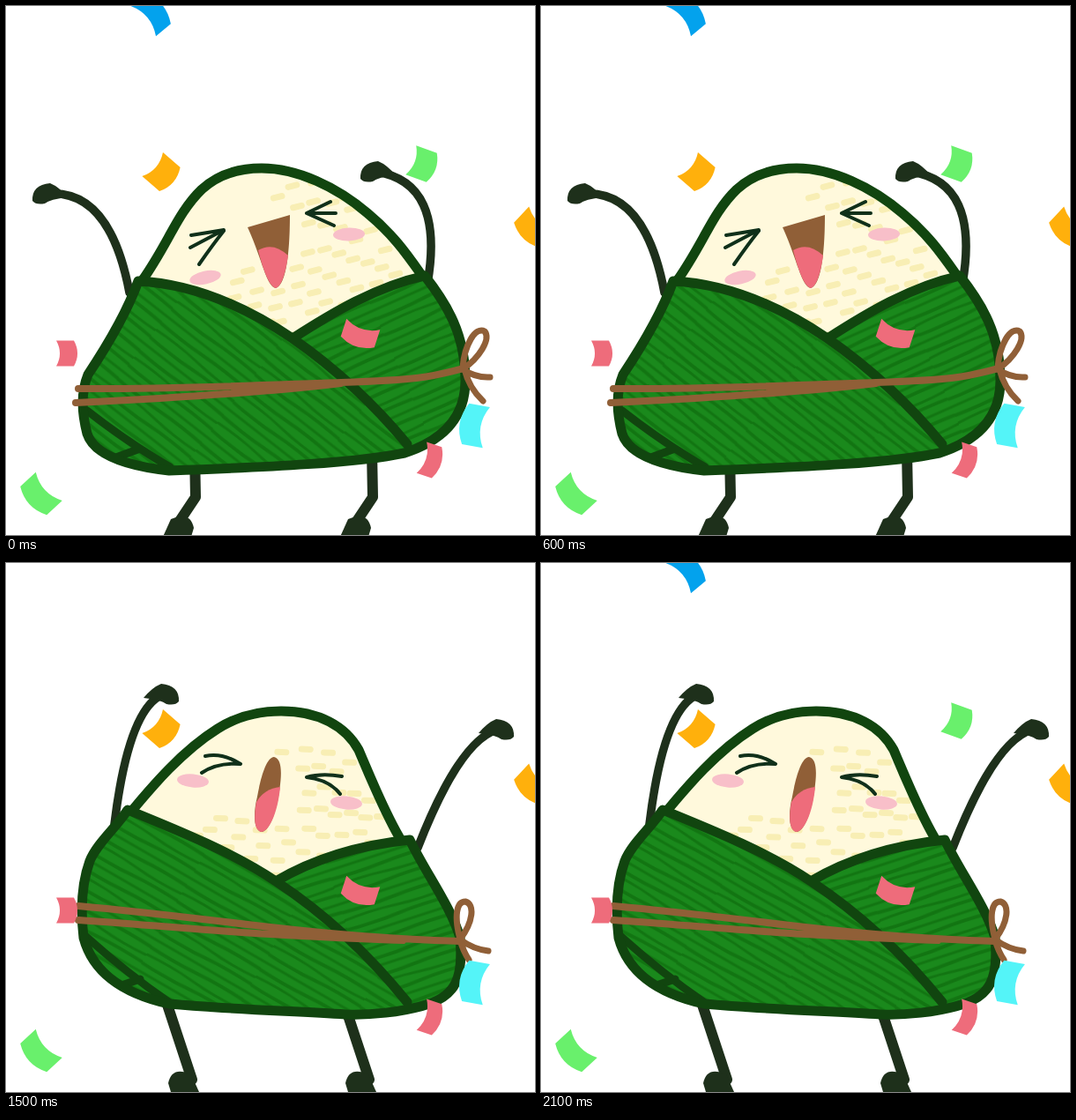
Write an HTML page that moves like this. It is 600x600 px and loops after 2.4 s.

```html
<!DOCTYPE html>
<html lang="en">
<head>
<meta charset="utf-8">
<title>Dancing rice dumpling</title>
<style>
  html, body { margin: 0; width: 100%; height: 100%; overflow: hidden; background: #fff; }
  svg { display: block; width: 100vw; height: 100vh; }
  .line { fill: none; stroke-linecap: round; stroke-linejoin: round; }
</style>
</head>
<body>
<svg id="stage" viewBox="0 0 600 600"></svg>
<script>
const C = {
  edge: '#11450f', leaf: '#1a891c', vein: '#127512', rice: '#fff9dc', grain: '#f8eeb4',
  limb: '#1e301b', eye: '#10301a', brown: '#905f37', pink: '#ee6c7b', cheek: '#f8bfc9',
  blue: '#03a2ed', orange: '#ffb00c', lime: '#69f06c', cyan: '#54f4f8'
};

const fill = (color, d) => `<path d="${d}" fill="${color}"/>`;
const line = (color, width, d) => `<path class="line" d="${d}" stroke="${color}" stroke-width="${width}"/>`;
const group = (content, attrs) => `<g ${attrs}>${content}</g>`;
const move = (content, x, y, flip = 1) => group(content, `transform="translate(${x} ${y}) scale(${flip} 1)"`);
const turn = (content, x, y, angle) => group(content, `transform="translate(${x} ${y}) rotate(${angle})"`);
const clip = (content, id) => group(content, `clip-path="url(#${id})"`);
const clipPath = (id, d) => `<clipPath id="${id}"><path d="${d}"/></clipPath>`;

// Slightly wavy leaf veins, repeated as a tile
function veins(id, angle) {
  let lines = '';
  for (let i = 0; i < 4; i++) {
    const y = 5 + i * 10, sway = Math.sin(i * 2.4) * 3;
    lines += line(C.vein, 3 + (i % 2) * 0.8, `M-5 ${y} Q30 ${y + sway} 60 ${y} T125 ${y}`);
  }
  return `<pattern id="${id}" width="120" height="40" patternUnits="userSpaceOnUse"
    patternTransform="rotate(${angle})"><rect width="120" height="40" fill="${C.leaf}"/>${lines}</pattern>`;
}

// Rice grains on rings around the mouth, leaving out the cheek on the left
function grains([x, y], tilt) {
  let out = '';
  for (let r = 46; r < 160; r += 17) {
    for (let a = r - 115 + tilt; a < 155 + tilt; a += 1550 / r) {
      const rad = (a + 5 * Math.sin(r + a)) * Math.PI / 180;
      out += turn(line(C.grain, 7, 'M-5 0H5'), x + r * Math.cos(rad), y + r * Math.sin(rad), tilt);
    }
  }
  return out;
}

const looks = {
  left: {
    rice: 'M154 312 C184 270 194 235 222 208 C245 187 272 184 290 184 C330 184 375 205 410 235 C440 260 455 282 472 306 L325 377Z',
    leaf: 'M150 312 C210 315 270 340 325 377 C370 348 420 318 475 306 C500 338 521 372 521 425 C521 465 498 492 452 507 C400 518 300 523 185 527 C140 522 100 510 92 485 C86 462 84 440 93 418 C115 385 138 345 150 312Z',
    fold: 'M325 377 Q398 428 455 497',
    corner: 'M92 459 Q138 495 186 523 M122 513 L152 502',
    veinAngles: [38, -24], grainCenter: [300, 262], tilt: -14,
    eyes: 'M210 260 L247 254 L209 274 M247 255 Q235 270 219 293 M368 222 L341 235 L374 235 M341 235 L372 249',
    mouth: 'M274 251 L322 237 C322 265 320 316 306 320 C295 318 290 285 274 251Z',
    tongue: 'M286 277 Q303 267 320 283 C317 305 312 318 306 320 C298 318 291 297 286 277Z',
    cheeks: [[226, 308, -12], [389, 259, -2]],
    string: 'M82 434 C180 435 290 430 380 427 S480 421 519 411 M79 450 C160 446 290 439 380 428',
    bow: 'M518 410 C520 385 532 363 543 369 C550 378 537 399 518 412 Q533 422 549 421 M520 412 Q525 433 541 448'
  },
  right: {
    rice: 'M142 282 C166 253 200 213 240 188 C265 172 290 168 312 168 C355 168 385 185 400 212 C412 240 430 285 449 316 L306 361Z',
    leaf: 'M138 280 C200 305 260 330 306 361 C350 335 400 320 458 314 C475 350 505 390 515 425 C519 470 510 490 480 500 C450 510 410 513 385 512 C320 508 250 506 185 500 C140 490 100 470 88 425 C84 390 87 360 95 338 C103 318 125 300 138 280Z',
    fold: 'M306 361 Q388 415 455 498',
    corner: 'M90 423 Q138 466 186 499 M122 482 L152 472',
    veinAngles: [30, -18], grainCenter: [298, 258], tilt: 2,
    eyes: 'M226 219 Q246 215 266 228 Q240 226 222 238 M381 242 Q358 238 341 243 Q367 246 379 262',
    mouth: 'M304 220 C314 222 313 242 309 265 C305 287 298 304 290 305 C281 304 280 285 285 265 C289 243 295 221 304 220Z',
    tongue: 'M284 271 Q293 256 311 254 C308 285 298 304 290 305 C281 304 281 287 284 271Z',
    cheeks: [[212, 247, 5], [386, 272, 5]],
    string: 'M82 389 C160 396 230 405 300 413 S440 427 515 429 M82 405 C170 411 230 417 300 421 S420 427 450 428',
    bow: 'M515 427 C508 400 511 384 521 384 C532 387 530 407 515 427 Q530 438 547 440 M515 428 Q519 441 525 450'
  }
};

const definitions = Object.entries(looks).map(([name, look]) =>
  veins(name + 'Front', look.veinAngles[0]) + veins(name + 'Back', look.veinAngles[1]) +
  clipPath(name + 'Leaf', look.leaf) + clipPath(name + 'Rice', look.rice)).join('');

const cheek = ([x, y, angle]) => turn(`<ellipse rx="18" ry="7.5" fill="${C.cheek}"/>`, x, y, angle);

function body(name) {
  const look = looks[name];
  const frontLeaf = fill(`url(#${name}Front)`, look.fold + 'V600H0V200H300Z');
  return fill(C.rice, look.rice) + clip(grains(look.grainCenter, look.tilt), name + 'Rice') +
    line(C.edge, 11, look.rice) +
    fill(`url(#${name}Back)`, look.leaf) + clip(frontLeaf + line(C.edge, 9, look.corner), name + 'Leaf') +
    line(C.edge, 11, look.fold + look.leaf) +
    look.cheeks.map(cheek).join('') +
    line(C.eye, 4, look.eyes) + fill(C.brown, look.mouth) + fill(C.pink, look.tongue) +
    line(C.brown, 8, look.string) + line(C.brown, 7, look.bow);
}

// Arms run hand, bend, shoulder; both legs share one shape
const poses = {
  leftDown: {
    look: 'left', shift: [0, 0], flip: 1,
    arms: [[48, 213, 118, 208, 140, 325], [420, 188, 498, 200, 478, 315]],
    leg: 'M214 505 L215 557 L193 590', foot: [195, 580]
  },
  leftUp: {
    look: 'left', shift: [0, -8], flip: 1,
    arms: [[48, 185, 85, 187, 140, 320], [420, 155, 464, 160, 476, 308]],
    leg: 'M219 505 L189 592', foot: [196, 584]
  },
  rightUp: {
    look: 'right', shift: [0, 0], flip: -1,
    arms: [[178, 149, 139, 165, 123, 296], [558, 189, 515, 200, 467, 323]],
    leg: 'M181 495 L211 586', foot: [202, 578]
  },
  rightDown: {
    look: 'right', shift: [-2, 15], flip: -1,
    arms: [[163, 194, 102, 218, 114, 318], [558, 236, 483, 240, 469, 350]],
    leg: 'M182 505 L185 554 L207 582', foot: [202, 578]
  }
};

const hand = fill(C.limb, 'M-18 8 Q-19 -10 2 -12 Q12 -8 22 4 Q2 6 -4 11 Q-14 13 -18 8Z');
const foot = fill(C.limb, 'M-17 22 L-8 2 Q14 -8 18 12 L15 22Z');
const LEG_GAP = 201;

function figure(pose) {
  const arms = pose.arms.map(([x, y, bendX, bendY, endX, endY]) =>
    line(C.limb, 9.5, `M${x} ${y} Q${bendX} ${bendY} ${endX} ${endY}`) + move(hand, x, y, pose.flip)).join('');
  const leg = line(C.limb, 12, pose.leg) + move(foot, ...pose.foot, pose.flip);
  return arms + leg + move(leg, LEG_GAP, 0) + move(body(pose.look), ...pose.shift);
}

// A ribbon scrap whose long edges bow the same way
function scrap(color, x, y, angle, length, width) {
  const a = length / 2, b = width / 2, bow = length * 0.28;
  return turn(fill(color, `M${-a} ${-b} Q0 ${bow - b} ${a} ${-b} V${b} Q0 ${bow + b} ${-a} ${b}Z`), x, y, angle);
}

const topConfetti = scrap(C.blue, 164, 10, -130, 45, 22) + scrap(C.lime, 471, 179, -70, 35, 25);
const confetti =
  scrap(C.orange, 176, 188, -49, 36, 26) + scrap(C.orange, 600, 251, 43, 42, 25) +
  scrap(C.pink, 67, 394, -90, 29, 20) + scrap(C.pink, 402, 371, 18, 40, 21) +
  scrap(C.pink, 480, 515, -72, 37, 18) +
  scrap(C.cyan, 533, 476, 100, 47, 24) + scrap(C.lime, 40, 553, 47, 44, 24);

const stage = document.getElementById('stage');
stage.innerHTML = `<defs>${definitions}</defs>` +
  Object.entries(poses).map(([name, pose]) => group(figure(pose), `id="${name}"`)).join('') +
  group(confetti + group(topConfetti, 'id="top"'), 'id="confetti"');

const STEP = 300;
const BEATS = 8;
const find = id => document.getElementById(id);
const start = performance.now();

function draw() {
  const beat = Math.floor((performance.now() - start) / STEP) % BEATS;
  const side = beat < BEATS / 2 ? 'left' : 'right';
  const current = side + (beat % 2 ? 'Up' : 'Down');
  for (const name in poses) find(name).style.visibility = name === current ? 'visible' : 'hidden';

  const fallen = current === 'leftUp' || current === 'rightDown';
  find('confetti').setAttribute('transform', fallen ? 'translate(-6 12)' : 'translate(0 0)');
  find('top').style.visibility = beat === 5 ? 'hidden' : 'visible';
  requestAnimationFrame(draw);
}
draw();
</script>
</body>
</html>
```
